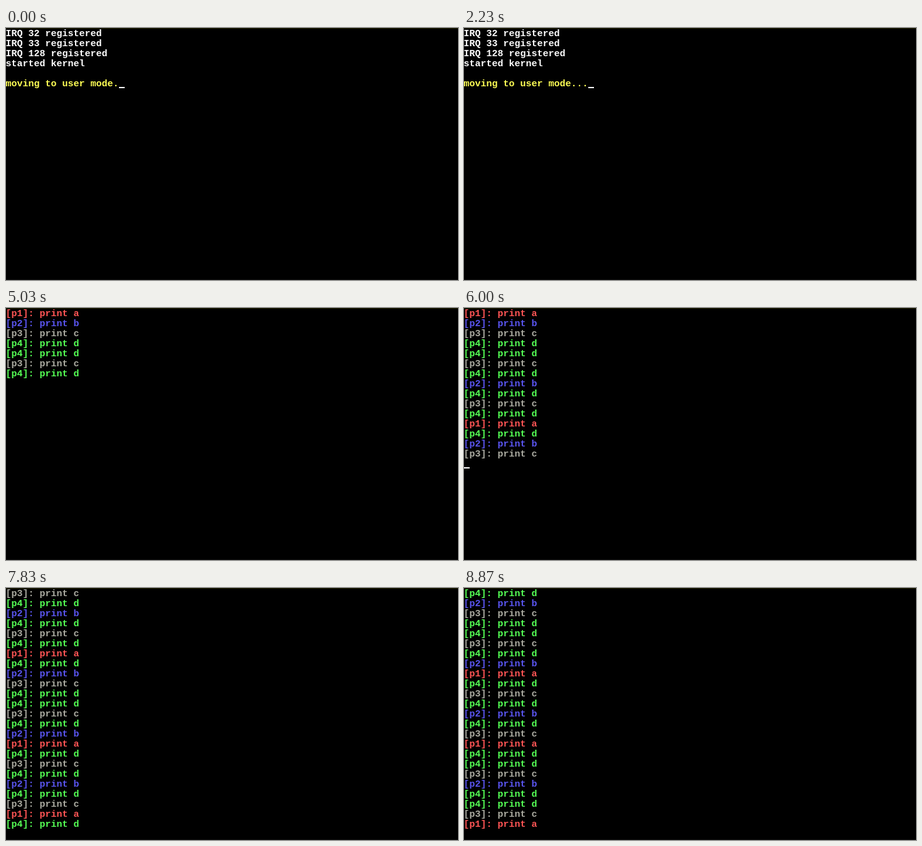
An HTML page with a canvas that plays this animation: 720x402 px, repeating every 8.91 s.

```html
<!DOCTYPE html>
<html lang="en">
<head>
<meta charset="utf-8">
<title>Kernel boot</title>
<style>
  html, body { margin: 0; width: 100%; height: 100%; overflow: hidden; background: #000; }
  canvas { display: block; }
</style>
</head>
<body>
<canvas id="screen" width="720" height="402"></canvas>
<script>
const ctx = document.getElementById('screen').getContext('2d');
const LOOP = 8910, CELL_W = 9, CELL_H = 16, COLS = 80, LAST_ROW = 24;
const DOTS = [0, 930, 1790];
const SPLASH = 2655, BAR_STEP = 20;
const RUN = 4260, TICK = 292;
const BLINK = 750;
const WHITE = '#ffffff', YELLOW = '#ffff55', AQUA = '#55ffbb';

const BOOT = ['IRQ 32 registered', 'IRQ 33 registered', 'IRQ 128 registered', 'started kernel'];
const BANNER = String.raw`
       __     ___      _ ____  _____
  ____/ /__  / (_)____(_) __ \/ ___/
 / __  / _ \/ / / ___/ / / / /\__ \
/ /_/ /  __/ / / /__/ / /_/ /___/ /
\__,_/\___/_/_/\___/_/\____//____/`.slice(1).split('\n');

// Each process prints once at the start, then at a steady period (in ticks).
const PROCESSES = [
  { text: '[p1]: print a', color: '#ff5555', period: 3.72, lead: 0.7 },
  { text: '[p2]: print b', color: '#5a55f0', period: 2.7, lead: 0 },
  { text: '[p3]: print c', color: '#aaaaa0', period: 1.9, lead: 0 },
  { text: '[p4]: print d', color: '#55ff55', period: 1, lead: 0 }
];
const LOG = PROCESSES.flatMap((p, order) => {
  const lines = [];
  for (let k = 0; k * p.period < 16; k++) {
    const ticks = k ? p.lead + k * p.period : 0;
    lines.push({ ...p, at: RUN + ticks * TICK, order });
  }
  return lines;
}).sort((a, b) => a.at - b.at || a.order - b.order);

function slash(x, y, flip) {
  const px = d => flip ? x + 7.5 - d : x + d;
  ctx.beginPath();
  ctx.moveTo(px(0.6), y + 11.7);
  ctx.lineTo(px(6.9), y + 4.3);
  ctx.stroke();
}

// Line-drawing characters fill the cell the way a console font does.
const STROKES = {
  '_': (x, y) => ctx.fillRect(x, y + 13, 8, 1),
  '=': (x, y) => { ctx.fillRect(x + 1, y + 5, 6, 1); ctx.fillRect(x + 1, y + 8, 6, 1); },
  '/': (x, y) => slash(x, y, false),
  '\\': (x, y) => slash(x, y, true)
};

function print(text, row, col, color) {
  ctx.fillStyle = ctx.strokeStyle = color;
  const y = row * CELL_H + 1;
  [...text].forEach((ch, i) => {
    const x = (col + i) * CELL_W;
    if (STROKES[ch]) STROKES[ch](x, y);
    else if (ch !== ' ') ctx.fillText(ch, x - 0.5, y + 12);
  });
}

function cursor(row, col, t) {
  if ((t / BLINK + 0.1) % 1 >= 0.5) return;
  ctx.fillStyle = WHITE;
  ctx.fillRect(col * CELL_W, row * CELL_H + 14, CELL_W, 2);
}

function boot(t) {
  BOOT.forEach((line, row) => print(line, row, 0, WHITE));
  const line = 'moving to user mode' + '.'.repeat(DOTS.filter(d => d <= t).length);
  print(line, 5, 0, YELLOW);
  cursor(5, line.length, t);
}

function splash(t) {
  print('='.repeat(COLS), 0, 0, WHITE);
  print('Welcome to', 6, 34, AQUA);
  BANNER.forEach((line, i) => print(line, 9 + i, 22, '#fffff0'));
  const filled = Math.min(COLS, Math.floor((t - SPLASH) / BAR_STEP));
  print('#'.repeat(filled), LAST_ROW, 0, '#fffff0');
  cursor(LAST_ROW, filled, t);
}

function run(t) {
  const shown = LOG.filter(line => line.at <= t).slice(-LAST_ROW);
  shown.forEach((line, row) => print(line.text, row, 0, line.color));
  cursor(shown.length, 0, t);
}

function draw(t) {
  ctx.fillStyle = '#000';
  ctx.fillRect(0, 0, 720, 402);
  ctx.fillStyle = '#222200';
  ctx.fillRect(0, 0, 720, 1);
  ctx.fillStyle = '#111111';
  ctx.fillRect(0, 401, 720, 1);
  ctx.font = 'bold 15px "Liberation Mono", monospace';
  ctx.lineWidth = 1.5;
  (t < SPLASH ? boot : t < RUN ? splash : run)(t);
}

const start = performance.now();
function frame() {
  draw((performance.now() - start) % LOOP);
  requestAnimationFrame(frame);
}
frame();
</script>
</body>
</html>
```
